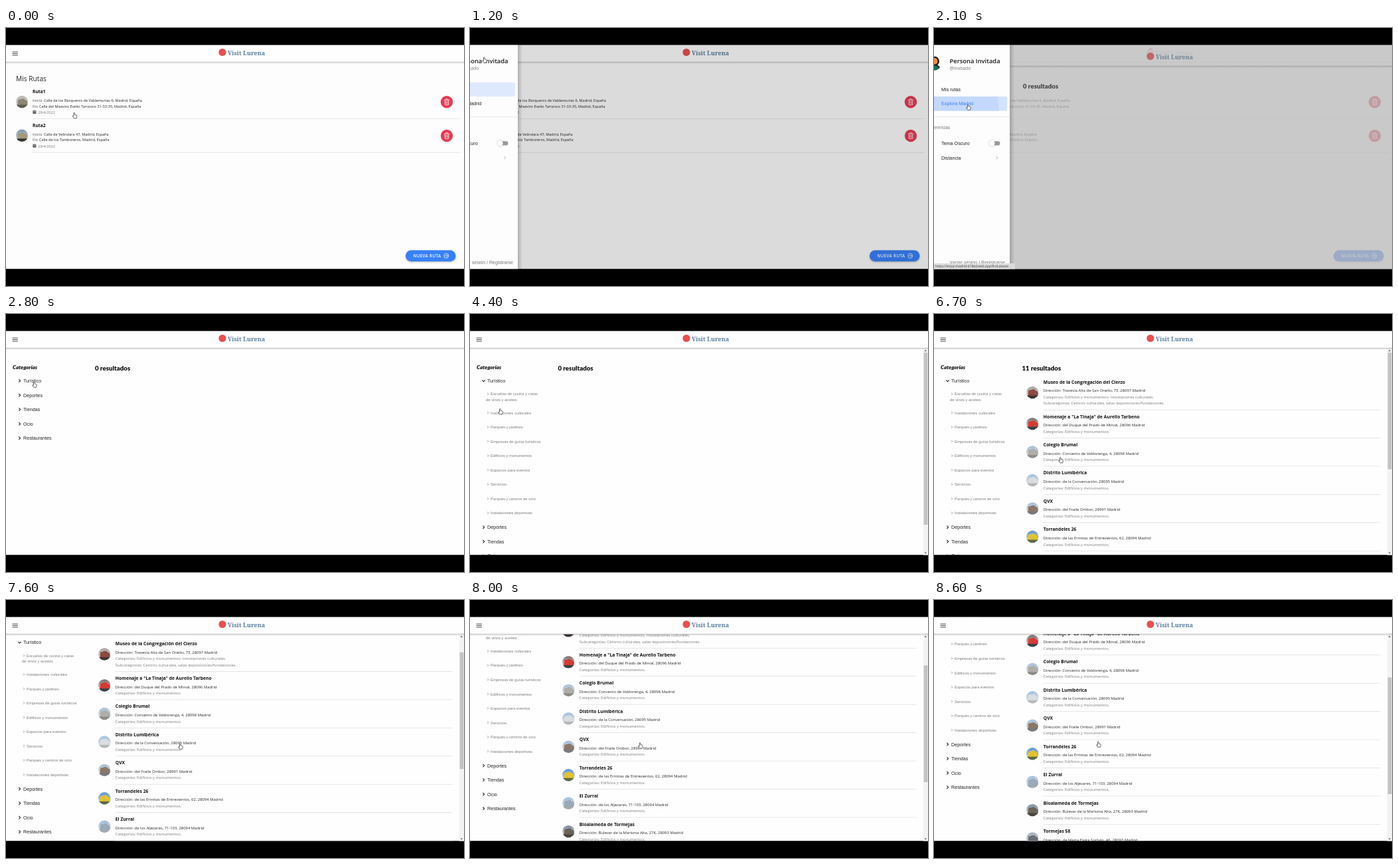
Recreate the animation shown at these times as an HTML page with a canvas. Size 690 by 388 pixels, loop 9 s.

```html
<!DOCTYPE html>
<html lang="es">
<head>
<meta charset="utf-8">
<title>Rutas</title>
<style>
html, body { margin: 0; width: 100%; height: 100%; overflow: hidden; background: #000; }
canvas { display: block; width: 690px; height: 388px; }
</style>
</head>
<body>
<canvas id="stage"></canvas>
<script>
const W = 690, H = 388, TOP = 25.5, BOTTOM = 362.5, LOOP = 9000, STEP = 100;
const canvas = document.getElementById('stage');
const dpr = window.devicePixelRatio || 1;
canvas.width = W * dpr;
canvas.height = H * dpr;
const c = canvas.getContext('2d');

const SANS = '"Open Sans", "Noto Sans", sans-serif';
const ARIAL = '"Liberation Sans", Arial, sans-serif';
const LATO = 'Lato, sans-serif';
const SERIF = '"Noto Serif", serif';

const routes = [
  { name: 'Ruta1', from: 'Calle de los Barqueros de Valdemurias 6', to: 'Calle del Maestro Evelio Tarranco 31-33-35', pic: ['#b9b7ae', '#8d8674', '#5d5a4e'] },
  { name: 'Ruta2', from: 'Calle de Velindara 47', to: 'Calle de los Tamboreros', pic: ['#7f98ad', '#a59a80', '#32382f'] }
];
const places = [
  ['Museo de la Congregación del Cierzo', 'Travesía Alta de San Onelio, 73, 28097', '#a9a3a0', '#8c4a40', '#3d3433'],
  ['Homenaje a "La Tinaja" de Aurelio Tarbeno', 'del Duque del Prado de Mirval, 28096', '#7c6f70', '#d63a34', '#3b4348'],
  ['Colegio Brumal', 'Convento de Valdorenga, 4, 28098', '#a9bfd6', '#b0aca8', '#8c8d86'],
  ['Distrito Lumibérica', 'de la Conversación, 28095', '#a7c0dc', '#d9dde0', '#b5b9ba'],
  ['QVX', 'del Fraile Ombor, 28991', '#a9bfd8', '#8b7768', '#777a80'],
  ['Torrandeles 26', 'de las Ermitas de Entrevientos, 62, 28094', '#5f93cf', '#e2c22e', '#5d6b4a'],
  ['El Zurral', 'de los Aljezares, 71-103, 28094', '#a3bddb', '#9aa9b8', '#a2a9ad'],
  ['Bioalameda de Tormejas', 'Bulevar de la Marisma Alta, 27K, 28093', '#7d8ca0', '#6b6259', '#47443f'],
  ['Tormejas 58', 'de Marta Elvira Sorbán, 46, 28093', '#a6b0bb', '#6a6f76', '#54575b']
];
const groups = ['Turístico', 'Deportes', 'Tiendas', 'Ocio', 'Restaurantes'];
const subs = ['Instalaciones culturales', 'Parques y jardines', 'Empresas de guías turísticos',
  'Edificios y monumentos', 'Espacios para eventos', 'Servicios', 'Parques y centros de ocio', 'Instalaciones deportivas'];

// time, x, y
const path = [
  [0, 103.5, 131.5], [100, 103, 131.5], [300, 103, 131.5], [700, 22, 48], [1300, 22, 48], [1800, 52, 119],
  [2200, 52, 119], [2800, 43, 106], [3200, 43, 106], [3500, 40.5, 106.5], [4100, 40.5, 106.5],
  [4800, 54.5, 208], [5200, 54.5, 220], [6100, 54.5, 220], [6200, 58.5, 219],
  [6400, 58.5, 219], [6900, 263, 220], [7600, 263, 220], [8500, 248, 217]
];
const drawerKeys = [[1100, 0], [1200, .527], [1300, .83], [1400, .95], [1500, 1], [2000, 1], [2100, .835], [2200, .42], [2300, .1], [2400, 0]];
const enterKeys = [[2000, 0], [2100, .7], [2200, .9], [2300, 1]];
const scrollKeys = [[7300, 0], [7600, 36.6], [8300, 98], [8600, 103.7]];

const clamp = v => Math.max(0, Math.min(1, v));
const ease = v => v * v * (3 - 2 * v);

function at(keys, t, i = 1, curve = v => v) {
  if (t <= keys[0][0]) return keys[0][i];
  for (let k = 1; k < keys.length; k++) {
    const a = keys[k - 1], b = keys[k];
    if (t <= b[0]) return a[i] + (b[i] - a[i]) * curve((t - a[0]) / (b[0] - a[0]));
  }
  return keys[keys.length - 1][i];
}

// y is the middle of the capitals
function text(s, x, y, size, color, family = SANS, style = '', spacing = 0) {
  c.font = `${style} ${size}px ${family}`;
  c.fillStyle = color;
  c.letterSpacing = spacing + 'px';
  c.fillText(s, x, y + size * .36);
  return c.measureText(s).width;
}

function rect(x, y, w, h, color) {
  c.fillStyle = color;
  c.fillRect(x, y, w, h);
}

function disc(x, y, r, color) {
  c.fillStyle = color;
  c.beginPath();
  c.arc(x, y, r, 0, Math.PI * 2);
  c.fill();
}

function pill(x, y, w, h, r, color) {
  c.fillStyle = color;
  c.beginPath();
  c.roundRect(x, y, w, h, r);
  c.fill();
}

function line(points, color, width = 1) {
  c.strokeStyle = color;
  c.lineWidth = width;
  c.beginPath();
  points.forEach(([x, y], i) => i ? c.lineTo(x, y) : c.moveTo(x, y));
  c.stroke();
}

function chevron(x, y, s, color, width, turn = 0) {
  c.save();
  c.translate(x, y);
  c.rotate(turn * Math.PI / 2);
  line([[-s / 2, -s], [s / 2, 0], [-s / 2, s]], color, width);
  c.restore();
}

function thumb(x, y, sky, body, ground) {
  c.save();
  c.beginPath();
  c.arc(x, y, 9.2, 0, Math.PI * 2);
  c.clip();
  const g = c.createLinearGradient(0, y - 9, 0, y + 9);
  g.addColorStop(0, sky);
  g.addColorStop(1, '#dfe3e6');
  rect(x - 10, y - 10, 20, 20, g);
  c.fillStyle = body;
  c.beginPath();
  c.moveTo(x - 7, y + 6);
  c.lineTo(x - 6, y - 3);
  c.lineTo(x + 2, y - 5);
  c.lineTo(x + 8, y - 1);
  c.lineTo(x + 9, y + 6);
  c.fill();
  rect(x - 10, y + 4.5, 20, 6, ground);
  c.restore();
}

function header() {
  rect(0, TOP, W, 26, '#fefefe');
  const g = c.createLinearGradient(0, 50.8, 0, 54);
  g.addColorStop(0, 'rgba(0,0,0,.26)');
  g.addColorStop(.5, 'rgba(0,0,0,.1)');
  g.addColorStop(1, 'rgba(0,0,0,0)');
  rect(0, 50.8, W, 3.2, g);
  for (let i = 0; i < 3; i++) rect(9.5, 35.6 + i * 2.45, 8.4, .95, '#444');
  disc(326, 36.5, 5.6, '#e8504f');
  text('Visit Lurena', 334, 37.6, 9, '#5a7d9c', SERIF, 'bold');
}

function trash(x, y) {
  disc(x, y, 9.2, '#e63c55');
  line([[x - 3.6, y - 3], [x + 3.6, y - 3]], '#fff', .8);
  line([[x - 1.3, y - 3.2], [x - 1.3, y - 4.4], [x + 1.3, y - 4.4], [x + 1.3, y - 3.2]], '#fff', .7);
  line([[x - 2.9, y - 3], [x - 2.5, y + 4.4], [x + 2.5, y + 4.4], [x + 2.9, y - 3]], '#fff', .8);
  for (let i = -1; i < 2; i++) line([[x + i * 1.2, y - 1.4], [x + i * 1.2, y + 3]], '#fff', .5);
}

function routesPage() {
  rect(0, TOP, W, BOTTOM - TOP, '#fdfdfd');
  text('Mis Rutas', 15, 76, 10.2, '#222');
  routes.forEach((r, i) => {
    const y = i * 50.8;
    thumb(24, 111 + y, ...r.pic);
    text(r.name, 40, 96 + y, 6.7, '#111', SANS, 'bold');
    text('Inicio', 40, 109 + y, 5.6, '#777', SANS, '600');
    text(r.from + ', Madrid, España', 57, 109 + y, 5.6, '#222');
    text('Fin', 40, 117.5 + y, 5.6, '#777', SANS, '600');
    text(r.to + ', Madrid, España', 50, 117.5 + y, 5.6, '#222');
    pill(40.3, 124 + y, 5.2, 5, .8, '#666');
    rect(40.9, 125.5 + y, 4, .5, '#ddd');
    text('29/4/2022', 48, 127.2 + y, 5.5, '#777');
    rect(40, 136.1 + y, 645, .7, '#dedede');
    trash(664, 111.2 + y);
  });
  c.save();
  c.shadowColor = 'rgba(0,0,0,.3)';
  c.shadowBlur = 3 * dpr;
  c.shadowOffsetY = 1.2 * dpr;
  pill(602, 334.3, 75.5, 16.6, 8.3, '#3880f8');
  c.restore();
  text('NUEVA RUTA', 613.5, 342.9, 6.2, '#fff', SANS, '600', .4);
  c.strokeStyle = '#fff';
  c.lineWidth = .75;
  c.beginPath();
  c.arc(663.3, 342.6, 3.5, 0, Math.PI * 2);
  c.stroke();
  line([[661.3, 342.6], [665.2, 342.6]], '#fff', .7);
  line([[663.7, 341], [665.3, 342.6], [663.7, 344.2]], '#fff', .7);
  header();
}

function categories(open) {
  text('Categorías', 10, 80.5, 8.1, '#111', LATO, 'italic 900');
  const extra = open * 198.6;
  groups.forEach((name, i) => {
    const y = 100.5 + i * 21.55 + (i ? extra : 0);
    chevron(20.5, y, 2.2, '#222', 1.1, i ? 0 : open);
    text(name, 26, y, 7.18, '#222', ARIAL);
  });
  if (!open) return;
  c.save();
  c.beginPath();
  c.rect(0, 111, 130, extra);
  c.clip();
  const gray = '#7c7c7c';
  chevron(27, 120.2, 1.6, gray, .8);
  text('Escuelas de cocina y catas', 31, 120.2, 5.88, gray, ARIAL);
  text('de vinos y aceites', 24, 128.7, 5.88, gray, ARIAL);
  subs.forEach((s, i) => {
    const y = 148.5 + i * 21.53;
    chevron(27, y, 1.6, gray, .8);
    text(s, 31, y, 5.88, gray, ARIAL);
  });
  c.restore();
}

function placeList() {
  places.forEach(([name, street, ...pic], i) => {
    const y = i ? 154.1 + (i - 1) * 42.45 : 102.1;
    const end = y + (i ? 32 : 41.7);
    thumb(148.3, i ? y + 11 : y + 16, ...pic);
    text(name, 164.8, y, 6.8, '#111', SANS, 'bold');
    text(`Dirección: ${street} Madrid`, 164.8, y + 12.9, 5.9, '#2a2a2a');
    text('Categorías: Edificios y monumentos.' + (i ? '' : ' Instalaciones culturales.'), 164.8, y + 22.5, 5.9, '#7a7a7a');
    if (!i) text('Subcategorías: Centros culturales, salas exposiciones/fundaciones.', 164.8, y + 32.2, 5.9, '#7a7a7a');
    rect(164.8, end, 508, .7, '#dcdcdc');
  });
}

function scrollbar(content, scroll) {
  rect(682.8, 52, 7.2, 311, '#f3f3f3');
  const k = 299 / content;
  rect(683.6, 58 + scroll * k, 5.8, 311 * k, '#c2c2c2');
  c.fillStyle = '#555';
  for (const [y, d] of [[55, -1], [359.5, 1]]) {
    c.beginPath();
    c.moveTo(684.6, y - d);
    c.lineTo(688, y - d);
    c.lineTo(686.3, y + d);
    c.fill();
  }
}

function placesPage(t) {
  const open = ease(clamp((t - 3800) / 400));
  const shown = clamp((t - 6300) / 300);
  const scroll = at(scrollKeys, t);
  const bar = open > .75;
  rect(0, TOP, W, BOTTOM - TOP, '#fefefe');
  c.save();
  c.translate(0, -scroll);
  categories(open);
  text((shown ? '11' : '0') + ' resultados', bar ? 132.4 : 134, 81.5, 9.7, '#111', LATO, '900');
  c.globalAlpha *= shown;
  if (shown) placeList();
  c.restore();
  if (bar) scrollbar(shown ? 530 : 359, scroll);
  header();
}

function drawer(p, t) {
  const w = 136.6, picked = t >= 2000;
  rect(0, TOP, W, BOTTOM - TOP, `rgba(0,0,0,${.25 * p})`);
  c.save();
  c.translate(w * (p - 1), 0);
  const g = c.createLinearGradient(w, 0, w + 7, 0);
  g.addColorStop(0, 'rgba(0,0,0,.2)');
  g.addColorStop(1, 'rgba(0,0,0,0)');
  rect(w, TOP, 7, 337, g);
  rect(0, TOP, w, 337, '#fdfdfd');

  c.save();
  c.beginPath();
  c.arc(23, 53, 10.5, 0, Math.PI * 2);
  c.clip();
  disc(23, 50, 7.5, '#222');
  disc(23, 50, 5, '#f08a3c');
  disc(23, 65, 10.5, '#222');
  disc(23, 65.6, 9.2, '#1f6b58');
  c.restore();

  text('Persona Invitada', 46, 49.6, 9.4, '#1a1a1a', SANS, '600');
  text('@invitado', 46, 61, 6.9, '#777');
  const y = picked ? 103 : 81.7;
  pill(0, y, 132.8, 21.4, [0, 2, 2, 0], picked ? '#d3e2fd' : '#dfe9fe');
  if (picked) {
    c.fillStyle = '#c3d8fc';
    c.beginPath();
    c.moveTo(0, y);
    c.lineTo(118, y);
    c.lineTo(120.5, y + 21.4);
    c.lineTo(0, y + 21.4);
    c.fill();
  }
  const ink = on => on ? '#3f7df5' : '#222';
  text('Mis rutas', 33.6, 92, 7.18, ink(!picked), ARIAL);
  text('Explora Madrid', 33.6, 113.7, 7.18, ink(picked), ARIAL);
  rect(0, 133.2, w, .7, '#ddd');
  text('Preferencias', 11.4, 149.6, 6.28, '#777', ARIAL);
  text('Tema Oscuro', 33.6, 173.4, 7.18, '#222', ARIAL);
  pill(109, 170.3, 13, 6.2, 3.1, '#999');
  c.save();
  c.shadowColor = 'rgba(0,0,0,.35)';
  c.shadowBlur = 2 * dpr;
  disc(110, 173.4, 4.3, '#fff');
  c.restore();
  text('Distancia', 33.6, 195, 7.18, '#222', ARIAL);
  chevron(117.2, 195, 2.3, '#999', .8);
  text('Iniciar sesión / Registrarse', 46.6, 352.4, 7.05, '#777', ARIAL);
  c.restore();
}

function status() {
  rect(0, 354, 122, 9, '#dcdcdc');
  text('https://enjoy-madrid-d18ed.web.app/find-places', 2, 358.5, 4.9, '#444');
}

function hand(x, y) {
  c.save();
  c.translate(x, y);
  c.beginPath();
  c.moveTo(-1.5, 1.2);
  c.lineTo(-1.5, -3.6);
  c.quadraticCurveTo(-.7, -4.8, .1, -3.6);
  c.lineTo(.1, -1.1);
  c.lineTo(2.6, -.6);
  c.quadraticCurveTo(3.5, -.2, 3.4, .8);
  c.lineTo(2.6, 4.3);
  c.lineTo(-1.2, 4.3);
  c.lineTo(-3.4, 1);
  c.quadraticCurveTo(-3, -.2, -1.5, 1.2);
  c.closePath();
  c.fillStyle = '#fff';
  c.fill();
  c.strokeStyle = '#444';
  c.lineWidth = .8;
  c.stroke();
  c.restore();
}

function draw(t) {
  c.setTransform(dpr, 0, 0, dpr, 0, 0);
  rect(0, 0, W, H, '#000');
  c.save();
  c.beginPath();
  c.rect(0, TOP, W, BOTTOM - TOP);
  c.clip();
  const enter = at(enterKeys, t);
  if (enter < 1) routesPage();
  if (enter > 0) {
    c.save();
    c.globalAlpha = enter;
    c.translate(0, (1 - enter) * 20);
    placesPage(t);
    c.restore();
  }
  const p = at(drawerKeys, t);
  if (p > 0) drawer(p, t);
  if (t >= 1700 && t < 2700) status();
  hand(at(path, t, 1, ease), at(path, t, 2, ease));
  c.restore();
}

let start = null;
function tick(now) {
  if (start === null) start = now;
  const t = (now - start) % LOOP;
  draw(Math.floor(t / STEP) * STEP);
  requestAnimationFrame(tick);
}
draw(0);
requestAnimationFrame(tick);
</script>
</body>
</html>
```
